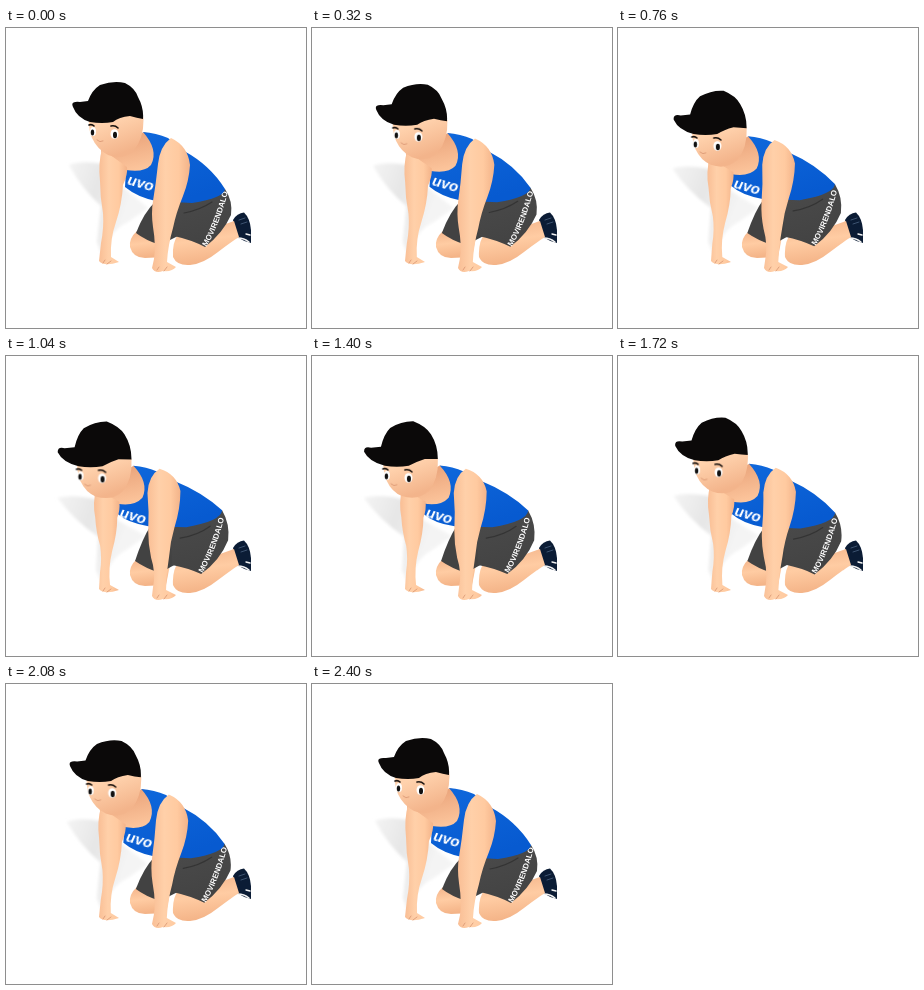
An HTML page without scripts for the animation above (2.44 s loop, 300x300 px).

```html
<!DOCTYPE html>
<html lang="en">
<head>
<meta charset="utf-8">
<title>Kneeling rock</title>
<style>
  html, body { margin: 0; width: 100%; height: 100%; overflow: hidden; background: #fff; }
  svg { display: block; width: 100%; height: 100%; }

  /* Every part swings to --to or --by and back; the return ends with a short rest. */
  .bend, .move { animation: bend 2440ms cubic-bezier(.364, 0, .636, 1) infinite; }
  .move { animation-name: move; }
  @keyframes bend {
    49.18% { d: var(--to); animation-timing-function: cubic-bezier(.352, 0, .616, 1); }
  }
  @keyframes move {
    49.18% { transform: var(--by); animation-timing-function: cubic-bezier(.352, 0, .616, 1); }
  }

  .line { fill: none; stroke-linecap: round; stroke-linejoin: round; }
  .crease { stroke: #d99572; stroke-width: .8; }
  .brow { stroke: #16100d; stroke-width: 1.6; }
  text { font-family: "Liberation Sans", Arial, sans-serif; font-weight: bold; fill: #fff; }
</style>
</head>
<body>
<svg viewBox="0 0 300 300">
  <defs>
    <linearGradient id="limb">
      <stop offset="0" stop-color="#f9be95"/>
      <stop offset=".35" stop-color="#ffd0a9"/>
      <stop offset=".7" stop-color="#ffcaa0"/>
      <stop offset="1" stop-color="#f3b389"/>
    </linearGradient>
    <linearGradient id="chest" x2=".3" y2="1">
      <stop offset=".2" stop-color="#eba67d"/>
      <stop offset="1" stop-color="#ffcaa1"/>
    </linearGradient>
    <linearGradient id="face" x2=".4" y2="1">
      <stop offset=".4" stop-color="#ffd2ad"/>
      <stop offset="1" stop-color="#f3b48b"/>
    </linearGradient>
    <linearGradient id="leg" x2=".2" y2="1">
      <stop offset="0" stop-color="#f3b389"/>
      <stop offset=".5" stop-color="#ffcca3"/>
      <stop offset="1" stop-color="#f4b488"/>
    </linearGradient>
    <linearGradient id="shirt" x2=".5" y2="1">
      <stop offset="0" stop-color="#0f68dc"/>
      <stop offset="1" stop-color="#075ad0"/>
    </linearGradient>
    <linearGradient id="shorts" x2=".3" y2="1">
      <stop offset="0" stop-color="#4b4b4b"/>
      <stop offset="1" stop-color="#434343"/>
    </linearGradient>
    <linearGradient id="shade" x2="1" y2=".4">
      <stop offset="0" stop-color="#f4f4f4"/>
      <stop offset=".4" stop-color="#e6e6e6"/>
      <stop offset=".8" stop-color="#f4f4f4"/>
    </linearGradient>
    <filter id="soft" x="-20%" y="-20%" width="140%" height="140%">
      <feGaussianBlur stdDeviation="1.5"/>
    </filter>
    <path id="seam" d="M200.500 219Q213.500 197 222.500 162"/>
  </defs>

  <path class="bend" fill="url(#shade)" filter="url(#soft)"
    d="M63 137Q74 132 97 136L118 160L142 180L122 194Q104 202 96 228L91 214L95 178Q76 161 63 137Z"
    style="--to:path('M51 142Q66 138 92 144L112 165L140 180L120 194Q104 202 96 228L90 214L92 181Q66 163 51 142Z')"/>

  <!-- far leg -->
  <path fill="url(#leg)" d="M131 203Q123 210 124 219Q127 230 139 230L160 229L165 204Z"/>
  <path class="bend" fill="#424242"
    d="M150 173Q138 184 130 205Q139 212 154 217L172 208L176 174Z"
    style="--to:path('M144 170Q136 183 129 205Q139 212 154 217L170 208L172 172Z')"/>

  <!-- foot and near leg -->
  <path fill="#0b1c35" d="M227 192Q231 185 238 184.500Q244 190 245 202L245 215Q237 213 231 209Z"/>
  <path class="line" stroke="#f4f4f4" stroke-width="1.4" d="M232 210Q238 210 243 214M240 206L244 207"/>
  <path class="line" stroke="#3d5370" d="M233 192L239 190M235 196L241 194"/>
  <path fill="url(#leg)" d="M173 205Q166 214 167 229Q171 238 184 237Q197 236 212 224Q225 214 233 209L228 193L200 203Z"/>

  <!-- shorts -->
  <path class="bend" fill="url(#shorts)"
    d="M168 172Q196 168 219 161Q227 173 225 187Q217 205 199 219Q186 212 168 208Z"
    style="--to:path('M164 168Q193 163 216 154Q224 168 222 184Q214 204 195 218Q182 212 166 209Z')"/>
  <path class="line bend" stroke="#343434" stroke-width="1.2"
    d="M178 185Q194 182 206 174" style="--to:path('M174 182Q192 179 204 170')"/>
  <g class="move" style="--by:translate(-4px,-2px)">
    <text font-size="7.900"><textPath href="#seam">MOVIRENDALO</textPath></text>
  </g>

  <!-- torso -->
  <path class="bend" fill="url(#chest)"
    d="M95 122Q112 113 138 104L162 112L152 144Q134 151 116 151L98 148Z"
    style="--to:path('M88 138Q103 124 127 110L154 117L143 145Q128 154 111 157L92 158Z')"/>
  <path class="bend" fill="url(#shirt)"
    d="M137 104Q150 105 162 110L178 123Q204 137 219 161Q218 170 186 175L150 173Q131 169 119 159L120 142Q138 145 145 137Q153 122 137 104Z"
    style="--to:path('M127 110Q140 111 151 116L168 125Q196 136 216 154Q215 165 180 171L142 170Q121 167 110 157L111 148Q128 151 136 142Q143 127 127 110Z')"/>
  <g class="move" style="--by:translate(-8px,5px)">
    <text transform="translate(120 156) rotate(16) skewX(-8)" font-size="15">uvo</text>
  </g>

  <!-- far arm -->
  <path class="bend" fill="url(#limb)"
    d="M96 121Q92 135 94 153Q94 169 97 185Q98 200 95 215L93 233Q98 239 113 234L105 229Q104 211 110 194Q116 176 117 157Q122 146 121 139Z"
    style="--to:path('M90 134Q86 147 89 162Q90 177 94 190Q96 203 94 216L93 233Q98 239 113 234L104 229Q102 212 106 195Q111 177 111 162Q114 154 113 146Z')"/>
  <path class="line crease" d="M101 236L105 233M97 235L99 232"/>

  <!-- near arm -->
  <path class="bend" fill="url(#limb)"
    d="M165 110Q154 118 152 136Q150 155 147 173Q145 185 147 199Q150 217 148 231L146 240Q149 246 157 243Q166 244 170 239L161 234Q162 217 167 200Q170 185 177 168Q183 153 184 137Q182 118 165 110Z"
    style="--to:path('M153 113Q142 120 141 137Q143 156 142 175Q142 188 145 202Q150 217 147 231L146 240Q149 246 157 243Q166 244 170 239L160 234Q160 217 163 200Q164 186 168 172Q174 153 174 135Q170 118 153 113Z')"/>
  <path class="line crease" d="M151 242L153 239M158 243L161 239"/>

  <!-- head -->
  <path class="bend" fill="url(#face)"
    d="M83 88Q82 101 86 110Q91 121 102 127Q117 133 128 122Q138 110 137.500 90L130 80L95 78Z"
    style="--to:path('M70 104Q70 116 74 126Q79 137 89 141Q105 146 116 136Q126 124 125 104L118 95L80 95Z')"/>
  <g class="move" style="--by:translate(-13px,17px)">
    <ellipse cx="87" cy="103.500" rx="3" ry="4.500" fill="#fff"/>
    <ellipse cx="86.500" cy="104.500" rx="1.700" ry="3" fill="#111"/>
    <ellipse cx="108.500" cy="106" rx="4" ry="4.800" fill="#fff"/>
    <ellipse cx="109" cy="107" rx="2" ry="3.200" fill="#111"/>
    <path class="line brow" d="M83 97Q86 96 88 98M105 98Q109 97 112 100"/>
    <path class="line crease" d="M91 112Q94 115 97 113"/>
  </g>
  <path class="bend" fill="#0b0909"
    d="M67 79Q64 73 74 74L82 73Q86 62 94 57Q108 52 119 55Q129 60 132 69Q138 80 137 91Q131 90 124 88Q113 89 107 94Q96 96 84 94Q71 90 67 79Z"
    style="--to:path('M51 97Q51 91 58 93L68 92Q71 79 77 73Q88 66 100 66Q113 71 118 79Q125 90 125 104Q119 104 112 104Q103 107 96 111Q84 113 72 111Q56 107 51 97Z')"/>
</svg>
</body>
</html>
```
